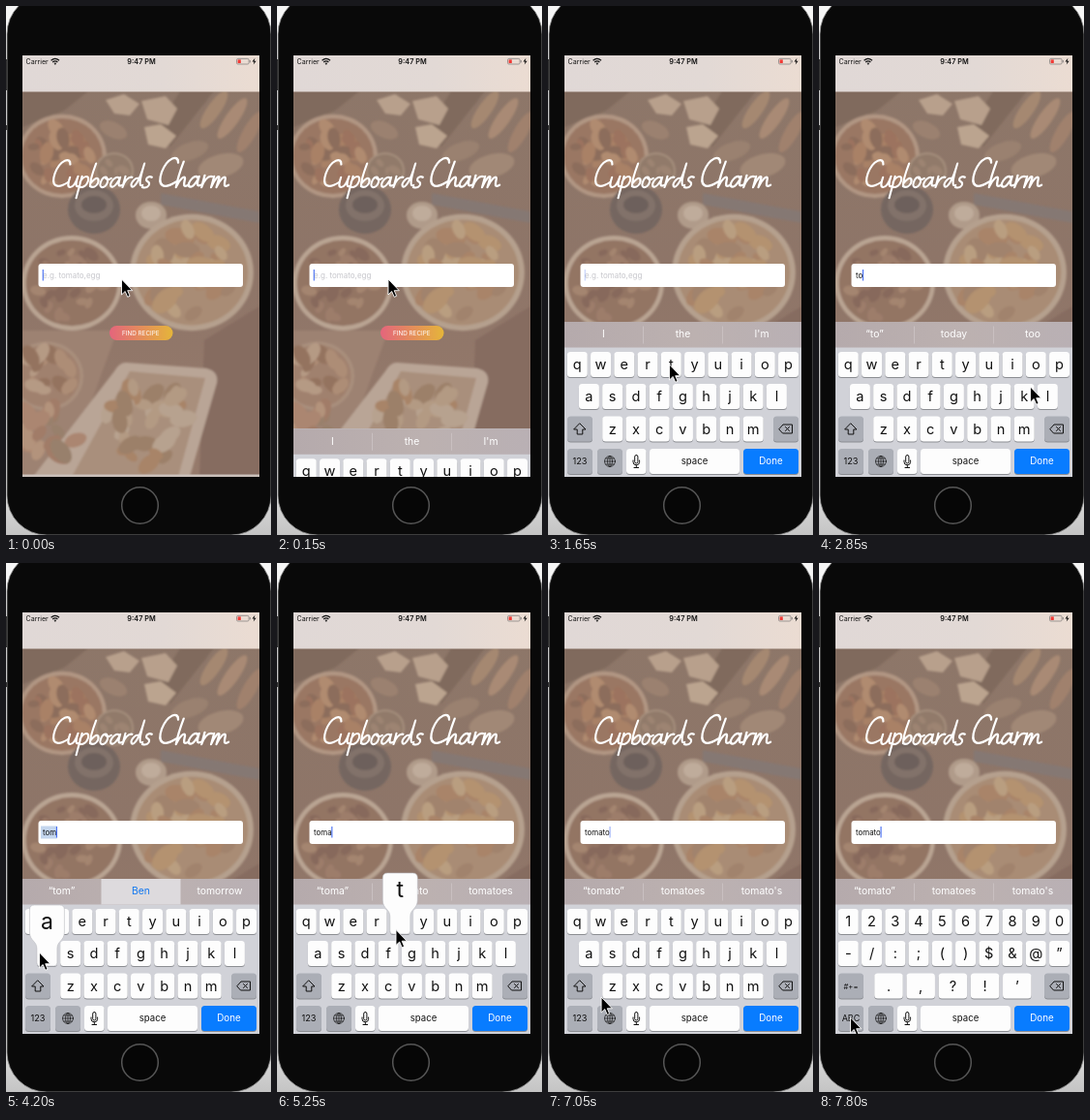
An HTML page for the animation above (8 s loop, 274x546 px).

```html
<!DOCTYPE html>
<html lang="en">
<head>
<meta charset="utf-8">
<title>Recipe search</title>
<style>
html, body { margin: 0; width: 100%; height: 100%; overflow: hidden; background: #e6e6e6; }
svg { display: block; width: 100vw; height: 100vh; }
text { font-family: Inter, Roboto, sans-serif; }
.mid { text-anchor: middle; }
.pen { fill: none; stroke: #fff; stroke-width: 2.1; stroke-linecap: round; stroke-linejoin: round; }
.icon { fill: none; stroke: #111; stroke-width: 1; stroke-linejoin: round; stroke-linecap: round; }
.thin { stroke-width: .65; }
</style>
</head>
<body>
<svg viewBox="0 0 274 546" preserveAspectRatio="none" xmlns="http://www.w3.org/2000/svg">
  <defs>
    <clipPath id="screen"><rect x="17" y="51" width="245" height="435"/></clipPath>
    <linearGradient id="page" x2="0" y2="1"><stop stop-color="#f6f6f6"/><stop offset=".9" stop-color="#e2e2e2"/><stop offset="1" stop-color="#c4c4c4"/></linearGradient>
    <linearGradient id="wood" x2="0" y2="1"><stop stop-color="#8d7769"/><stop offset=".5" stop-color="#8e7568"/><stop offset="1" stop-color="#967a6b"/></linearGradient>
    <linearGradient id="head"><stop stop-color="#e0d8d6"/><stop offset=".6" stop-color="#e2d9d5"/><stop offset="1" stop-color="#ebdcd2"/></linearGradient>
    <linearGradient id="warm"><stop stop-color="#e4657c"/><stop offset="1" stop-color="#e5b53a"/></linearGradient>
    <linearGradient id="bar"><stop stop-color="#b5aaac"/><stop offset=".55" stop-color="#bcb1b0"/><stop offset="1" stop-color="#b9b0b4"/></linearGradient>
    <filter id="soft"><feGaussianBlur stdDeviation="1.3"/></filter>
  </defs>
  <rect width="274" height="546" fill="url(#page)"/>
  <rect x="1" y="-12" width="273" height="558" rx="41" fill="#090909" stroke="#8e8e8e" stroke-width=".8"/>
  <path d="M0 55v32M0 123v5" stroke="#333" stroke-width="2"/>
  <circle cx="138.5" cy="515.5" r="18.8" fill="#060606" stroke="#565656" stroke-width="1.5"/>
  <g clip-path="url(#screen)">
    <rect x="17" y="51" width="245" height="435" fill="url(#wood)"/>
    <g id="photo" filter="url(#soft)"></g>
    <rect x="17" y="483.5" width="245" height="3" fill="#c9bfb9"/>
    <rect x="17" y="51" width="245" height="37.5" fill="url(#head)"/>
    <text x="20.5" y="60" font-size="7.1" fill="#111">Carrier</text>
    <g fill="none" stroke="#111" stroke-width="1.3">
      <path d="M46.6 56.2q4.2-3.7 8.4 0M48.2 58q2.6-2.2 5.2 0"/>
      <circle cx="50.8" cy="59.5" r=".4"/>
    </g>
    <text class="mid" x="140" y="60" font-size="7.3" font-weight="600" fill="#111">9:47 PM</text>
    <rect x="238.5" y="54.4" width="12.6" height="5.6" rx="1.3" fill="none" stroke="#8a8482" stroke-width=".8"/>
    <rect x="239.6" y="55.4" width="3.2" height="3.6" fill="#f03a35"/>
    <path d="M252.3 56v2.4" stroke="#8a8482"/>
    <path d="M257.4 53.8l-2.9 3.8h2l-.7 3 2.9-3.9h-2z" fill="#111"/>
    <g id="title" role="img" aria-label="Cupboards Charm"></g>
    <rect x="33.5" y="266" width="211.5" height="24" rx="3" fill="#fff"/>
    <rect id="mark" x="36" y="271.5" height="13" fill="#c4d6ee"/>
    <text id="hint" x="38" y="281" font-size="8" fill="#c6c6cb">e.g. tomato,egg</text>
    <text id="typed" x="38" y="281" font-size="7.9" fill="#111"></text>
    <rect id="caret" y="272" width="1.1" height="11.5" fill="#426bf2"/>
    <rect x="107" y="330" width="65.5" height="15" rx="7.5" fill="url(#warm)"/>
    <text class="mid" x="139.3" y="339.9" font-size="6.3" fill="#fff">FIND RECIPE</text>
    <g id="board">
      <rect x="17" y="326" width="245" height="160" fill="#d1d2d8"/>
      <rect x="17" y="326" width="245" height="26.5" fill="url(#bar)"/>
      <rect id="pick" x="98.5" y="326" width="82" height="26.5" fill="#dddadd"/>
      <path id="rules" d="M98.5 330.5v18M180.5 330.5v18" stroke="#cdc5c6" stroke-width=".8"/>
      <g id="words" class="mid" font-size="10.4" fill="#fff">
        <text x="57.5" y="342.3"></text><text x="139.5" y="342.3"></text><text x="221" y="342.3"></text>
      </g>
      <g id="letters"></g>
      <g id="digits"></g>
      <g id="base"></g>
      <g id="popup">
        <path d="M-13 -37h26q5 0 5 5v23c0 9 -7.5 9 -7.5 17v14.5q0 3.5 -3.5 3.5h-14q-3.5 0 -3.5 -3.5v-14.5c0 -8 -7.5 -8 -7.5 -17v-23q0 -5 5 -5z" fill="#fdfdfd" stroke="#b9bbc0" stroke-width=".6"/>
        <text class="mid" y="-12" font-size="23" fill="#111"></text>
      </g>
    </g>
    <path id="arrow" d="M0 0V16L3.7 12.5 6.2 18.3 8.6 17.3 6.2 11.7H11.3Z" fill="#000" stroke="#fff" stroke-width=".9"/>
  </g>
</svg>
<script>
const $ = id => document.getElementById(id);
const LOOP = 8000, STEP = 150, WORD = 'tomato';

// Backdrop: a table of food in flat shapes
let seed = 11;
const rnd = () => (seed = seed * 16807 % 2147483647) / 2147483647;
const oval = (x, y, rx, ry, turn, fill) =>
  `<ellipse cx="${x}" cy="${y}" rx="${rx}" ry="${ry}" fill="${fill}" transform="rotate(${turn} ${x} ${y})"/>`;
const shape = (d, fill) => `<path d="${d}" fill="${fill}"/>`;
function bits(x, y, r, n, size, fills) {
  let out = '';
  for (let i = 0; i < n; i++) {
    const a = rnd() * 6.283, d = Math.sqrt(rnd()) * r, s = size * (0.6 + rnd() * 0.7);
    out += oval((x + d * Math.cos(a)).toFixed(1), (y + d * Math.sin(a)).toFixed(1),
      s.toFixed(1), (s * 0.6).toFixed(1), Math.round(rnd() * 180), fills[i % fills.length]);
  }
  return out;
}
const bowl = (x, y, r, rim, fill, n, size, fills) =>
  oval(x, y, r, r * 0.94, 0, rim) + oval(x, y, r * 0.91, r * 0.85, 0, fill) + bits(x, y, r * 0.7, n, size, fills);

$('photo').innerHTML =
  shape('M17 88H85L60 108 17 125ZM180 88H215L170 145 150 135Z', '#806a5d') +
  shape('M160 193L262 212V224L160 205Z', '#857873') +
  shape('M205 345L262 310V486H200Z', '#866c60') +
  shape('M17 335H115L60 486H17Z', '#9d8272') +
  shape('M103 97L122 91 138 101 128 113 112 111ZM140 98L165 93 177 106 168 123 146 117Z', '#b8a08c') +
  shape('M143 125L160 122 176 134 165 147 147 143Z', '#bba48f') +
  [[111, 128, 15, 8, 25, '#9b8170'], [215, 107, 7, 23, 35, '#a58871'], [234, 116, 7, 25, 35, '#a98a74'],
   [252, 130, 7, 24, 30, '#a0816d'], [190, 150, 20, 9, -20, '#9a8170'], [222, 165, 24, 12, -15, '#a18876'],
   [150, 216, 16, 14, 0, '#b09b8a'], [150, 214, 10, 8, 0, '#bfac9b']].map(a => oval(...a)).join('') +
  bowl(58, 155, 46, '#b19683', '#9a7763', 30, 9, ['#a98166', '#8c6d5c', '#b08b70', '#9c735f']) +
  bowl(112, 170, 20, '#a8927f', '#917a6b', 5, 6, ['#9d8472']) +
  bowl(68, 286, 52, '#b9a493', '#937464', 34, 7, ['#9d7d6b', '#87695b', '#a4856f']) +
  bowl(192, 275, 64, '#b5a08e', '#a98c75', 34, 13, ['#b4926f', '#a98469', '#b99e80', '#a1836d']) +
  oval(91, 210, 27, 25, 0, '#746660') + oval(91, 206, 20, 16, 0, '#82726a') + oval(91, 205, 13, 9, 0, '#6d605b') +
  bowl(42, 382, 38, '#a98f7d', '#a0816e', 16, 10, ['#ad8d76', '#94735f', '#b59a84']) +
  shape('M124 368L207 374Q220 377 218 389L190 486H28L112 377Q117 368 124 368Z', '#b9a596') +
  shape('M128 377L206 384 178 486H68Z', '#a98f7c') +
  bits(148, 428, 45, 34, 12, ['#b39a83', '#a88468', '#b7a28f', '#9c8069']) +
  bits(48, 440, 32, 18, 12, ['#ab8671', '#a17c68', '#b3937b', '#98806c']);

// Brush lettering: [advance, pen path]
const PEN = {
  C: [17, 'M16-23C15-31 5-28 2-14C0-2 6 3 17-5'],
  u: [11, 'M1-10C0-4 0 0 3 0C6 0 8-5 9-11C8-5 8 0 11-1'],
  p: [11, 'M2-11L0 11M1-5C4-13 10-12 9-6C8 0 3 1 1-1'],
  b: [10, 'M3-24C1-14 0-5 1-1C6 2 10-4 8-8C6-11 3-7 1-4'],
  o: [11, 'M6-10C1-11-1-1 3 0C8 1 10-9 5-10C6-7 9-7 11-9'],
  a: [12, 'M8-9C4-13-1-4 1-1C4 2 8-5 9-10C8-4 8 0 12-2'],
  r: [9, 'M2-11L1 0C2-6 5-11 9-10'],
  d: [12, 'M8-8C4-12-1-4 1-1C4 2 8-6 10-24C8-8 8 0 12-2'],
  s: [9, 'M8-10C4-12 1-8 4-6C9-4 6 2 0 0'],
  h: [12, 'M4-24C2-14 1-6 1 0C3-7 7-12 8-8C8-4 7 1 12-2'],
  m: [18, 'M2-10L1 0C3-7 6-12 7-9L6 0C8-7 12-12 13-8C13-4 12 1 17-2']
};
function script(word, x, y, size) {
  let at = 0;
  const strokes = [...word].map(c => {
    const [w, d] = PEN[c];
    at += w;
    return `<path transform="translate(${at - w} 0)" d="${d}"/>`;
  });
  return `<g class="pen" transform="translate(${x} ${y}) skewX(-10) scale(${size})">${strokes.join('')}</g>`;
}
$('title').innerHTML = script('Cupboards', 46, 187, 1.02) + script('Charm', 156, 187, 1.1);

// Keyboard
const PITCH = 24.25, TOPS = [357, 390, 423.5, 457], GREY = '#abaeb6';
const key = (x, y, w, fill = '#fdfdfd') =>
  `<rect x="${x}" y="${y + 1}" width="${w}" height="26" rx="3.5" fill="#8b8d92"/>` +
  `<rect x="${x}" y="${y}" width="${w}" height="26" rx="3.5" fill="${fill}"/>`;
const label = (s, x, y, size, fill = '#111') =>
  `<text class="mid" x="${x}" y="${y}" font-size="${size}" fill="${fill}">${s.replace('&', '&amp;')}</text>`;
const spots = {};
function row(chars, x, n, pitch = PITCH, w = 21) {
  return [...chars].map((c, i) => {
    const cx = x + i * pitch, y = TOPS[n];
    spots[c] = [cx, y];
    return key(cx - w / 2, y, w) + label(c, cx, y + 18, 14.6);
  }).join('');
}
const side = (s, n, size) => key(20, TOPS[n], 26, GREY) + label(s, 33, TOPS[n] + 16.3, size);

$('letters').innerHTML = row('qwertyuiop', 30.3, 0) + row('asdfghjkl', 42.4, 1) + row('zxcvbnm', 66.7, 2) +
  key(20, TOPS[2], 26, GREY) +
  '<path class="icon" d="M33 431l6 6h-3.2v5h-5.6v-5H27z"/>' + side('123', 3, 9.2);
$('digits').innerHTML = row('1234567890', 30.3, 0) + row('-/:;()$&@”', 30.3, 1) +
  row('.,?!’', 72, 2, 33.2, 29.5) + side('#+=', 2, 7.6) + side('ABC', 3, 9);
$('base').innerHTML =
  key(233, TOPS[2], 26, GREY) +
  '<path class="icon" d="M239 436.5l4-4.5h9.5v9H243zM245.5 434.5l4 4m0-4l-4 4"/>' +
  key(51, TOPS[3], 26, GREY) +
  '<g class="icon thin"><circle cx="64" cy="470" r="5.5"/><ellipse cx="64" cy="470" rx="2.5" ry="5.5"/>' +
  '<path d="M58.5 470h11M64 464.5v11M59.6 467h8.8M59.6 473h8.8"/></g>' +
  key(81, TOPS[3], 20.5) +
  '<path class="icon" d="M88 469v1.5a3.3 3.3 0 0 0 6.6 0V469M91.3 474v2.5M89 476.5h4.6"/>' +
  '<rect class="icon" x="89.7" y="463.5" width="3.2" height="8.5" rx="1.6"/>' +
  key(105, TOPS[3], 93) + label('space', 151.5, 472.8, 9.6) +
  key(202, TOPS[3], 57, '#087cff') + label('Done', 230.5, 473, 9.8, '#fff');

// Timeline
const TYPED = [1950, 2550, 3300, 4350, 5400, 6450];
const PRESS = [1800, 2400, 3150, 4200, 5250, 6300];
const GUESS = [['the', 'to'], ['today', 'too'], ['Ben', 'tomorrow'],
  ['tomato', 'tomatoes'], ['tomato', 'tomatoes'], ['tomatoes', "tomato's"]];
const PATH = [[0, 119.5, 282], [150, 115, 282], [450, 109.5, 282], [900, 109.5, 282], [1500, 125.5, 370],
  [1950, 125.5, 370], [2400, 219, 371], [2650, 219, 372], [2850, 218.5, 393], [3000, 212, 435],
  [3150, 211, 439], [3300, 211, 439], [4050, 34.5, 402], [4350, 34.5, 402], [5100, 123, 378],
  [5400, 123, 379], [6150, 219.5, 371], [6450, 219.5, 371], [7200, 36, 457], [7400, 32.5, 469], [8000, 32.5, 469]];
const clamp = v => Math.max(0, Math.min(1, v));
const ease = u => u * u * (3 - 2 * u);

function pointer(t) {
  const i = PATH.findIndex(p => p[0] > t);
  const [t0, x0, y0] = PATH[i - 1], [t1, x1, y1] = PATH[i];
  const u = ease((t - t0) / (t1 - t0));
  return [x0 + (x1 - x0) * u, y0 + (y1 - y0) * u];
}
function blink(ms) {
  const p = ms % 1000;
  return p < 500 ? 1 : p < 800 ? clamp((720 - p) / 220) : clamp((p - 800) / 90);
}
const show = (el, on) => el.setAttribute('visibility', on ? 'visible' : 'hidden');

const words = [...$('words').children], [, big] = $('popup').children;

function draw(t) {
  const n = TYPED.filter(at => at <= t).length;
  const text = WORD.slice(0, n), picked = n === 3;

  $('typed').textContent = text;
  show($('hint'), !n);
  const width = n ? $('typed').getComputedTextLength() : 0;
  $('mark').setAttribute('width', width + 2.5);
  show($('mark'), picked);
  $('caret').setAttribute('x', 37.7 + width);
  $('caret').setAttribute('opacity', blink(n ? t - TYPED[n - 1] : t));

  const guess = n ? ['“' + text + '”', ...GUESS[n - 1]] : ['I', 'the', "I'm"];
  words.forEach((w, i) => { w.textContent = guess[i]; });
  words[1].setAttribute('fill', picked ? '#1478f0' : '#fff');
  show($('pick'), picked);
  show($('rules'), !picked);

  const rise = 1 - clamp((t - 100) / 290);
  $('board').setAttribute('transform', `translate(0 ${161 * rise * rise})`);
  show($('letters'), t < 7500);
  show($('digits'), t >= 7500);

  const down = n < WORD.length && t >= PRESS[n];
  show($('popup'), down);
  if (down) {
    big.textContent = WORD[n];
    $('popup').setAttribute('transform', `translate(${spots[WORD[n]]})`);
  }
  $('arrow').setAttribute('transform', `translate(${pointer(t)})`);
}

function tick() {
  const t = performance.now() % LOOP;
  draw(Math.min(Math.floor(t / STEP) * STEP, 7800));
  requestAnimationFrame(tick);
}
tick();
</script>
</body>
</html>
```
